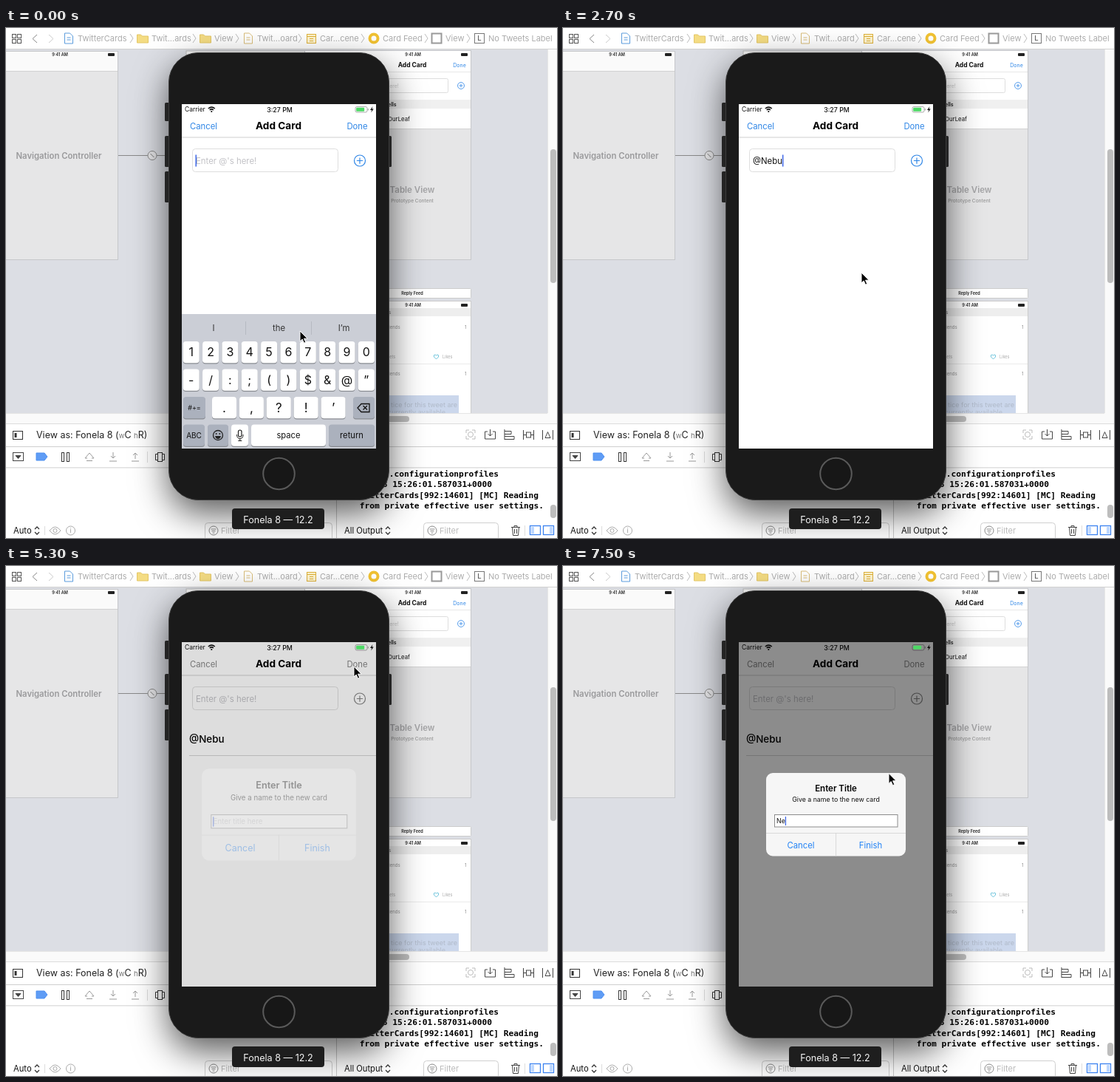
An HTML page for the animation above (7600 ms loop, 746x690 px).

```html
<!DOCTYPE html>
<html lang="en">
<head>
<meta charset="utf-8">
<title>Add Card</title>
<style>
html, body { margin: 0; width: 100%; height: 100%; overflow: hidden; background: #fff }
svg { display: block; width: 746px; height: 690px; font-family: Inter, Roboto, sans-serif }
text { white-space: pre }
.mono { font-family: "DejaVu Sans Mono", "Liberation Mono", monospace }
.shadow { filter: drop-shadow(0 18px 24px rgba(0,0,0,.65)) }
</style>
</head>
<body>
<svg id="stage" viewBox="0 0 746 690"></svg>
<script>
const BLUE = '#2f86e6', DARK = '#444';

// Markup helpers; text is placed by the centre of its capitals.
const rect = (x, y, w, h, fill, more = '') =>
  `<rect x="${x}" y="${y}" width="${w}" height="${h}" fill="${fill}" ${more}/>`;
const path = (d, stroke = DARK, fill = 'none', more = '') =>
  `<path d="${d}" stroke="${stroke}" fill="${fill}" ${more}/>`;
const circle = (x, y, r, stroke = DARK, fill = 'none', more = '') =>
  `<circle cx="${x}" cy="${y}" r="${r}" stroke="${stroke}" fill="${fill}" ${more}/>`;
const text = (x, y, s, size, fill = '#111', anchor = 'start', weight = 400, more = '') =>
  `<text x="${x}" y="${y + size * .364}" font-size="${size}" fill="${fill}" text-anchor="${anchor}" font-weight="${weight}" ${more}>${s}</text>`;
const mid = (x, y, s, size, fill, weight, more) => text(x, y, s, size, fill, 'middle', weight, more);
const group = (id, body, more = '') => `<g id="${id}" ${more}>${body}</g>`;

function topBar() {
  const crumbs = [[97, 'TwitterCards'], [197, 'Twit...ards'], [282, 'View'], [340, 'Twit...oard'],
    [425, 'Car...cene'], [510, 'Card Feed'], [595, 'View'], [653, 'No Tweets Label']];
  const folder = x => path(`M${x} 9h5l2 2h8v9h-15z`, '#e3c667', '#f4dc83');
  const page = (x, c) => path(`M${x} 7h7l4 4v10h-11z`, c, '#fff') + path(`M${x + 3} 13h5m-5 3h5`, c);
  let s = rect(0, 0, 746, 28, '#fff') + rect(0, 28, 746, 1, '#d2d2d2');
  for (const x of [8.5, 15.5]) for (const y of [8.5, 15.5]) s += rect(x, y, 5, 5, 'none', 'stroke="#555"');
  s += path('M42 9l-6 5.500 6 5.500', '#888') + path('M58 9l6 5.500-6 5.500', '#ccc');
  s += page(79.5, '#5a9bdc') + folder(177.5) + folder(262.5) + page(322.5, '#d9bd79') +
    rect(407.5, 8.5, 12, 12, '#fff5cf', 'stroke="#dfb23c"') + path('M408 11.500h11m-8 3h5m-5 3h5', '#dfb23c') +
    circle(498, 14, 5.5, '#f1c232', '#fff', 'stroke-width="4"') +
    rect(576.5, 7.5, 13, 13, '#fff', 'stroke="#999" stroke-width="2"') +
    rect(634.5, 7.5, 13, 13, '#fff', 'stroke="#777"') + mid(641, 14, 'L', 9.5, DARK);
  for (const x of [168, 253, 311, 396, 481, 567, 624]) s += path(`M${x} 8l4 6-4 6`, '#bbb');
  return s + crumbs.map(([x, c]) => text(x, 14, c, 11, '#acacac')).join('');
}

function storyboard() {
  const status = (x, y, b) => mid(x, y, '9:41 AM', 5.5, '#222', 600) + rect(b, y - 2, 9, 4, '#222', 'rx="1"');
  return rect(0, 29, 733, 492, '#dcdee4') +
    rect(-1, 31.5, 152.5, 282, '#e6e6e7', 'stroke="#c6c7ca"') + rect(0, 32, 151, 26, '#fafafa') +
    rect(0, 58, 151, 1, '#d2d2d2') + status(73, 36, 138) +
    mid(71.5, 172.5, 'Navigation Controller', 11.3, '#9a9a9c', 600) +
    path('M152 172.500h64', '#888') + circle(198, 172.5, 6, '#888', '#e6e6e8') + path('M195.500 170l5 5', '#777') +
    rect(244, 31, 161, 10, '#f8f8f8', 'stroke="#bbb"') +
    rect(404.5, 30.5, 225, 283, '#e6e6e7', 'stroke="#c6c7ca"') + rect(405, 31, 224, 66, '#fff') + status(551, 36, 616) +
    mid(550, 49.5, 'Add Card', 8.5, '#111', 700) + mid(614, 50, 'Done', 7, BLUE) +
    rect(405, 59, 224, .7, '#ddd') + rect(420, 68.5, 178.5, 19, '#fff', 'rx="2" stroke="#ddd"') +
    text(515, 78, 'here!', 7, '#ccc') + plus(616, 78, 4.5, .8, BLUE) +
    rect(405, 97, 224, 12, '#f0f0f0') + text(517, 103, 'ells', 7, '#222', 'start', 600) +
    rect(405, 109, 224, 27, '#fff') + text(517, 123, 'OurLeaf', 7.8) + rect(405, 136, 224, .7, '#ccc') +
    mid(550, 219, 'Table View', 11.5, '#a4a4a6', 600) + mid(550, 233.5, 'Prototype Content', 6.6, '#999', 500) +
    rect(404.5, 352.5, 225, 13, '#fff', 'rx="1" stroke="#ccc"') + mid(550, 359, 'Reply Feed', 5.5, '#222', 600) +
    rect(404.5, 369.5, 225, 160, '#fff', 'stroke="#ccc"') + status(551, 375, 616) +
    rect(405, 379, 224, 11, '#eee') + text(518, 385, 's', 6, '#666') +
    [405, 468].map(y => text(516, y, 'riends', 6, '#999') + text(621, y, '1', 6, '#888')).join('') +
    rect(405, 454, 224, .7, '#e2e2e2') + text(516, 445, 'eets', 5.5, '#aaa') + text(591, 445, 'Likes', 5.5, '#aaa') +
    path('M582.500 448l-3-3q-1-3 1.500-3l1.500 1 1.500-1q2.500 0 1.500 3z', '#6cc4dc') +
    rect(430, 497, 183, 24, '#cbd7ec') + text(611, 510, 'tice for this tweet are', 9, '#b0bac9', 'end') +
    text(595, 520, 'currently available', 9, '#b4bdcb', 'end') +
    rect(0, 521, 746, 14, '#fafafa') + rect(0, 521, 733, .7, '#ddd') + rect(250, 525, 296, 8, '#bdbdbd', 'rx="4"') +
    rect(733, 29, 13, 506, '#fafafa') + rect(733, 29, .7, 492, '#ddd') + rect(737, 164, 8, 181, '#bdbdbd', 'rx="4"');
}

function plus(x, y, r, w, color) {
  return path(`M${x - r} ${y}a${r} ${r} 0 1 1 ${2 * r} 0a${r} ${r} 0 1 1 ${-2 * r} 0M${x - r * .55} ${y}h${r * 1.1}M${x} ${y - r * .55}v${r * 1.1}`,
    color, 'none', `stroke-width="${w}"`);
}

function bottomBars() {
  const updown = x => path(`M${x} 678l3-3 3 3m-6 4l3 3 3-3`, '#333', 'none', 'stroke-width="1.300"');
  const filter = (x, w) => rect(x + .5, 669.5, w, 24, '#fff', 'rx="4" stroke="#cfcfcf"') +
    circle(x + 12, 680, 6, '#888') + path(`M${x + 8.5} 678h7m-6 2.500h5m-4 2.500h3`, '#888') + text(x + 22, 680, 'Filter', 11, '#bbb');
  const lines = [[667, 603, '.configurationprofiles'], [658, 617, '8 15:26:01.587031+0000'],
    [721, 631.5, 'TwitterCards[992:14601] [MC] Reading'], [728, 645.5, 'from private effective user settings.']];
  let s = rect(0, 535, 746, 155, '#fff') + rect(0, 535, 746, .8, '#d4d4d4') + rect(0, 566, 746, .8, '#c4c4c4') +
    rect(0, 594.5, 746, .8, '#c4c4c4') + rect(447, 595, 1, 95, '#c8c8c8');
  s += rect(9.5, 545.5, 13, 11, 'none', 'stroke="#333"') + rect(11.5, 548, 3, 6, '#333') +
    `<text x="41" y="554.500" font-size="12.500" fill="#222">View as: Fonela 8 (<tspan font-size="9.500" fill="#777">w</tspan>C <tspan font-size="9.500" fill="#777">h</tspan>R)</text>`;
  s += circle(629, 550, 3.5, '#bbb') + path('M623 548v-4h4m4 0h4v4m0 4v4h-4m-4 0h-4v-4', '#bbb') +
    path('M652 546h-3.500v10h14v-10h-3.500M655.500 543v9m-3-3l3 3 3-3') +
    path('M675 543v14M675 545.500h9v4h-9M675 552.500h13v4h-13') +
    path('M700.500 544v13m14-13v13M701 550.500h3m7 0h3') + rect(704.5, 547, 6, 7, 'none', 'stroke="#444"') +
    path('M726.500 544v13m14-13v13M730 554.500l3.500-8 3.500 8z');
  s += rect(9.5, 574.5, 14, 11, 'none', 'stroke="#444"') + path('M13 578.500h7l-3.500 4z', DARK, DARK) +
    path('M41 575h11l4 5-4 5h-11z', '#4d8ff0', '#5f9cf5') + rect(75.5, 574.5, 3, 12, 'none', 'stroke="#333"') + rect(82.5, 574.5, 3, 12, 'none', 'stroke="#333"') +
    path('M107 582l6-7 6 7h-3m-6 0h-3M109 585.500h8M145 574v8m-3-3l3 3 3-3M140 586h10M175 583v-8m-3 3l3-3 3 3M170 586h10', '#999') +
    rect(191, 573, 1, 15, '#ddd') + rect(205.5, 574.5, 6, 12, 'none', 'stroke="#333"') + path('M205 576.500h-2.500v8h2.500m7-8h2.500v8h-2.500', '#333');
  s += lines.map(([x, y, l]) => text(x, y, l, 11.2, '#000', 'end', 700, 'class="mono"')).join('');
  s += rect(737, 645, 8, 18, '#bdbdbd', 'rx="4"');
  s += text(10, 680, 'Auto', 11.2) + updown(39) + rect(52, 674, 1, 12, '#ddd') +
    path('M59 680q7.500-10 15 0q-7.500 10-15 0z', '#aaa') + circle(66.5, 680, 2.5, '#aaa') +
    circle(87.5, 680, 6, '#aaa') + mid(87.5, 680, 'i', 9, '#999') + filter(269, 172) +
    text(458, 680, 'All Output', 11.2) + updown(514) + filter(565, 101) +
    path('M684 675.500h12m-8 0v-2h4v2m-6.500 0l1 11h7l1-11M688.500 678v6m3-6v6') + rect(702, 673, 1, 14, '#ddd');
  for (const x of [709.5, 727.5]) s += rect(x, 673.5, 14, 12, '#fff', 'stroke="#3b82f0" stroke-width="1.300"');
  return s + rect(711, 675, 4, 9, '#bdd8ff') + rect(736, 675, 4, 9, '#bdd8ff');
}

function keyboard() {
  const key = (x, y, w, label, size, fill = '#fff') =>
    rect(x, y - 13.5, w, 29.5, '#898c92', 'rx="4"') + rect(x, y - 14.5, w, 29.3, fill, 'rx="4"') +
    mid(x + w / 2, y, label, size, '#111');
  const SHADE = '#abb1bd';
  let keys = '';
  ['1234567890', '-/:;()$&@”'].forEach((row, r) => [...row].forEach((c, i) => {
    keys += key(239.7 + 26.35 * i, 438.5 + 37.5 * r, 22, c === '&' ? '&amp;' : c, 16);
  }));
  keys += key(240, 513.5, 30, '#+=', 9, SHADE);
  [...'.,?!’'].forEach((c, i) => keys += key(279 + 36.9 * i, 513.5, 33, c, 17));
  keys += key(470, 513.5, 29, '', 9, SHADE) + path('M476 514l5-5.500h11v11h-11zM483.500 511l5.500 5.500m0-5.500l-5.500 5.500', '#111', 'none', 'stroke-width="1.300"');
  keys += key(240, 551, 29, 'ABC', 10, SHADE) + key(273, 551, 28, '', 9, SHADE) + key(305, 551, 23, '', 9) +
    key(332, 551, 101, 'space', 11.2) + key(437, 551, 62, 'return', 11.2, SHADE);
  keys += circle(287, 551, 6.5, '#222', 'none', 'stroke-width="1.300"') + circle(284.7, 549, 1, 'none', '#222') + circle(289.3, 549, 1, 'none', '#222') +
    path('M283 552h8q-1 4-4 4t-4-4z', 'none', '#222') +
    rect(314.5, 544, 4.5, 9, 'none', 'rx="2.200" stroke="#222" stroke-width="1.200"') + path('M312.500 550q0 5.500 4.300 5.500t4.300-5.500m-4.300 5.500v3m-2.500 0h5', '#222');
  return rect(238, 387, 263, 182, '#cbced6', 'id="keyBg"') + group('keys', keys) +
    group('hints', [281, 369.5, 457.5].map(x => mid(x, 405.5, '', 11.3, '#333', 400, 'class="hint"')).join('')) +
    group('bars', rect(324, 397, 1, 18, '#b6bac2') + rect(413, 397, 1, 18, '#b6bac2'));
}

function phone() {
  const button = (x, y, h, w = 8) => rect(x, y, w, h, '#242424', 'rx="1.500"');
  const bar = text(242, 110, 'Carrier', 8.5) +
    path('M273.800 109q4.500-3.800 9 0M275.700 111q2.600-2.200 5.200 0', '#111', 'none', 'stroke-width="1.500"') + circle(278.3, 113, 1.1, 'none', '#111') +
    mid(370.5, 110.5, '3:27 PM', 8.8, '#111', 500) +
    rect(473, 106.5, 16, 7.5, '#fff', 'rx="2" stroke="#999" stroke-width=".800"') +
    rect(489.7, 109, 1, 2.5, '#999') + path('M496.500 106l-3.500 5h2.200l-1 3.500 3.500-5h-2.200z', 'none', '#111');
  const app = rect(238, 103, 263, 466, '#fff') + bar +
    group('tint', mid(267.5, 132.5, 'Cancel', 11.3, '', 400) + mid(475.5, 132.5, 'Done', 11.3, '', 400, 'id="done"') +
      group('add', plus(479, 179.5, 7.5, 1.2, 'currentColor')), 'fill="currentColor"') +
    mid(369, 132, 'Add Card', 13.6, '#000', 700) + rect(238, 147.5, 263, .9, '#c9c9c9') +
    rect(252.5, 163.5, 197, 31, '#fff', 'rx="4" stroke="#dedede"') +
    text(257, 179.5, "Enter @'s here!", 11.4, '#c2c2c6', 'start', 400, 'id="hold"') +
    text(257, 179.5, '', 11.4, '#111', 'start', 400, 'id="handle"') + rect(0, 171.5, 1.5, 16, '#3f68e8', 'id="caret"') +
    text(248, 234, '@Nebu', 13.4, '#000', 'start', 500, 'id="row"') + rect(248, 256, 253, .9, '#d0d0d0', 'id="rule"') +
    rect(238, 387, 263, .9, '#e0e0e0', 'id="edge"') + group('kb', keyboard());
  const alert = rect(275, 280, 189, 112.5, '#f6f6f6', 'rx="9"') + mid(369.5, 300.5, 'Enter Title', 11.5, '#000', 600) +
    mid(369.5, 315.5, 'Give a name to the new card', 8.8, '#111') + rect(286.5, 336.5, 166.5, 16.5, '#fff', 'stroke="#8c8c8c"') +
    text(289, 345, 'Enter title here', 8.8, '#c4c4c8', 'start', 400, 'id="titleHold"') + text(289, 345, '', 8.8, '#111', 'start', 400, 'id="title"') +
    rect(0, 339, 1.3, 12, '#3f68e8', 'id="titleCaret"') + rect(275, 361, 189, .8, '#d2d2d2') + rect(369, 361, .8, 31.5, '#d2d2d2') +
    mid(322, 377.5, 'Cancel', 11.3, '#2383f5') + mid(416.5, 377.5, 'Finish', 11.3, '#2383f5');
  const charge = rect(474.2, 107.7, 11, 5, '#4cd964', 'rx="1"');
  return '<clipPath id="screen"><rect x="238" y="103" width="263" height="466"/></clipPath>' +
    rect(220.5, 33.5, 298, 605, '#1a1a1a', 'rx="40" class="shadow"') +
    button(215, 101, 25) + button(215, 146, 42) + button(215, 194, 42) + button(514, 146, 42) +
    rect(220.5, 33.5, 298, 605, '#1a1a1a', 'rx="40" stroke="#3c3c3c"') +
    circle(369.5, 603, 21.3, '#5a5a5a', '#171717', 'stroke-width="2"') +
    group('app', app + rect(238, 103, 263, 466, '#000', 'id="dim"') + charge + group('alert', alert), 'clip-path="url(#screen)"') +
    rect(306, 650, 125, 28, '#1e1e1e', 'rx="4"') + mid(368.5, 665, 'Fonela 8 — 12.2', 12.6, '#f4f4f4');
}

const stage = document.getElementById('stage');
stage.innerHTML = storyboard() + topBar() + bottomBars() + phone() +
  group('pointer', path('M0 0v14l3.200-3 2.300 5.200 2.300-1-2.300-5h4.600z', '#fff', '#000', 'stroke-width="1"'));

const $ = id => document.getElementById(id);
const set = (id, attrs) => { for (const k in attrs) $(id).setAttribute(k, attrs[k]); };
const show = (id, on) => set(id, { opacity: +on });
const ramp = (t, a, b) => Math.min(1, Math.max(0, (t - a) / (b - a)));
const ease = u => u * u * (3 - 2 * u);
const mix = (a, b, u) => a + (b - a) * u;

// Each move: start, end, x, y
const moves = [[100, 700, 404, 331], [2800, 3400, 479, 178], [4200, 4800, 471, 136], [7160, 7760, 421, 377]];
const hints = [['I', 'the', 'I’m'], ['is', 'was', 'has']];
const typed = (word, times, t) => word.slice(0, times.filter(k => t >= k).length);

function type(id, caret, hold, word) {
  $(id).textContent = word;
  show(hold, !word);
  set(caret, { x: +$(id).getAttribute('x') + (word ? $(id).getComputedTextLength() : -.5) });
}

function draw(t) {
  let x = 398, y = 410;
  for (const [a, b, toX, toY] of moves) {
    const u = ease(ramp(t, a, b));
    x = mix(x, toX, u);
    y = mix(y, toY, u);
  }
  set('pointer', { transform: `translate(${x} ${y})` });

  type('handle', 'caret', 'hold', t < 3500 ? typed('@Nebu', [1000, 2000, 2300, 2500, 2700], t) : '');
  show('caret', t < 3500);

  const fold = ramp(t, 1900, 2100), away = ease(ramp(t, 2100, 2500));
  set('keyBg', { y: 387 + 27 * fold, height: 182 - 31 * fold });
  set('keys', { transform: `translate(0 ${-4 * fold})` });
  set('hints', { transform: `translate(0 ${27 * fold})`, opacity: 1 - ramp(t, 2100, 2300) });
  show('bars', fold === 0);
  show('edge', fold > 0 && away < 1);
  set('kb', { transform: `translate(0 ${182 * away})` });
  document.querySelectorAll('.hint').forEach((el, i) => el.textContent = hints[+(t >= 1000)][i]);

  set('add', { opacity: t >= 3500 && t < 3800 ? .2 : 1 });
  set('row', { opacity: ramp(t, 3700, 4000) });
  set('done', { opacity: t >= 5100 && t < 5300 ? .65 : 1 });
  show('rule', t >= 5300);
  set('tint', { color: t >= 5300 ? '#858585' : BLUE });

  const open = ramp(t, 5200, 5500);
  const scale = 1 + .2 * (1 - open) ** 2 + .016 * (1 - ramp(t, 5500, 5700));
  set('dim', { opacity: .4 * open + .05 * ramp(t, 5500, 5800) });
  set('alert', { opacity: open, transform: `translate(369.5 336) scale(${scale}) translate(-369.5 -336)` });
  type('title', 'titleCaret', 'titleHold', typed('Ne', [6600, 6900], t));
}

const start = performance.now();
function tick() {
  const t = (performance.now() - start) % 7600;
  draw(Math.floor(t / 100) * 100);
  requestAnimationFrame(tick);
}
tick();
</script>
</body>
</html>
```
